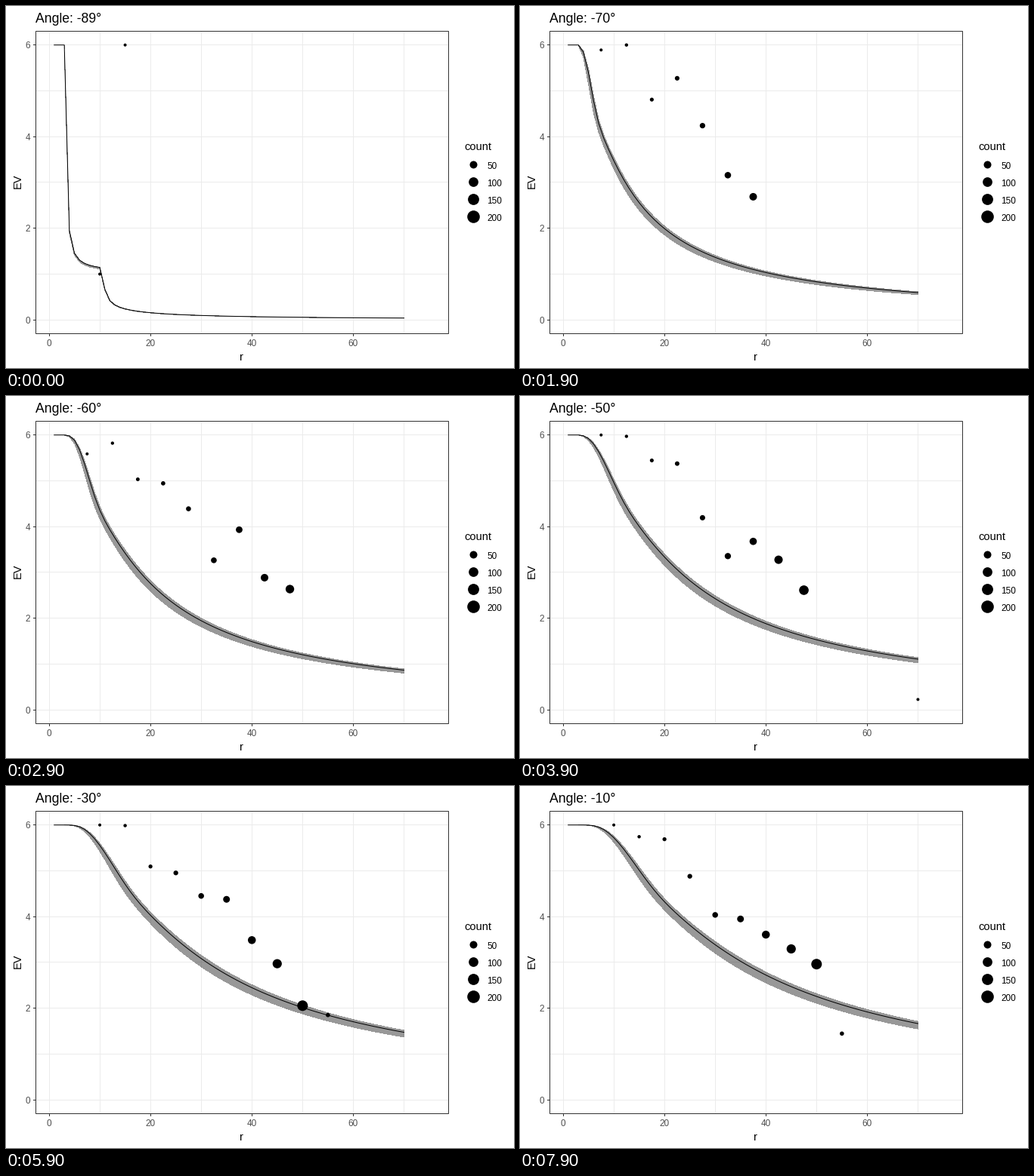
A matplotlib script that plays this animation: 672 px wide and 480 px high, repeating every 8 s.

```python
import numpy as np
import matplotlib.pyplot as plt
from matplotlib.animation import FuncAnimation
from matplotlib.patches import Polygon, Rectangle

W, H, DPI = 672, 480, 96
FRAMES, INTERVAL = 80, 100
PX = 72 / DPI
GREY = "#333333"
R = np.arange(1, 71)

plt.rcParams["font.family"] = "Liberation Sans"


def to_px(r, ev):
    return 57 + 6.706 * np.asarray(r), 416.2 - 60.75 * np.asarray(ev)


def steep_curve(r):
    """Curve at the steepest angle: a shelf up to r = 10, then a long tail."""
    shelf = 1.05 + 0.9 / np.maximum(r - 3, 0.1) ** 1.15
    tail = 2.2 / r + 0.47 / np.maximum(r - 10, 0.1)
    return np.where(r <= 10, shelf, tail)


def curve(angle, r, spread=1.0):
    """EV over r; spread above 1 lowers the curve, below 1 raises it."""
    c = np.cos(np.radians(angle))
    r = np.asarray(r, float)
    u = r * spread / c
    p = 1.29 + 0.8 * max(0, (0.643 - c) / 0.3)
    near = 6 * (1 - np.exp(-1.303 * (20 / u) ** p))
    far = 6 / (1 + (u / 20.4) ** 2.1) ** (1 / 2.1)
    mix = 1 / (1 + np.exp(np.minimum((u - 18) / 2.5, 50)))
    ev = mix * near + (1 - mix) * far
    w = np.clip((0.15 - c) / 0.1325, 0, 1)
    ev = (1 - w) * ev + w * steep_curve(r) / min(max(spread, 1), 1.03)
    return np.where(r <= 3, 6, ev)


def dots(angle):
    """r, EV and radius: EV falls and radius grows with r, plus some noise."""
    rng = np.random.default_rng(100 - angle)
    steep = np.clip((-84 - angle) / 5, 0, 1)
    start = 7.5 if -85 < angle < -35 else 10
    last = 15 + 44.5 * (1 - np.exp(-(angle + 89) / 22))
    r = np.arange(start, last + 0.01, 5)
    peak = min(r[-1], 50)
    t = (r - start) / (peak - start)

    first_ev, last_ev = 6 - 5 * steep, 2.4 + 3.6 * steep
    ev = first_ev + (last_ev - first_ev) * t ** 1.2
    ev += (1 - steep) * rng.normal(0, 0.3, len(r))
    grow = (1 - steep) * np.clip(3 + (angle + 70) / 15, 1.5, 5)
    radius = np.where(r > peak, 2.8, 2 + grow * t ** 1.5)

    # now and then a lone weak hit far out
    if angle > -70 and rng.random() < 0.4:
        r = np.append(r, 60 + 5 * rng.integers(4))
        ev = np.append(ev, rng.random() ** 3)
        radius = np.append(radius, 2)
    return r, np.clip(ev, 0, 6), radius


def shown_angle(i):
    """The picture steps twice in every five ticks and holds in between."""
    if i < 3:
        k = 0
    elif i == 3 or i % 5 == 4:
        k = i
    else:
        k = i - i % 5
    return k - 89


def area(radius):
    return (2 * np.asarray(radius) * PX) ** 2


fig = plt.figure(figsize=(W / DPI, H / DPI), dpi=DPI, facecolor="white")
ax = fig.add_axes([0, 0, 1, 1])
ax.set_xlim(0, W)
ax.set_ylim(H, 0)
ax.axis("off")


def rule(x, y, color):
    ax.plot(x, y, color=color, lw=PX, snap=False,
            solid_capstyle="butt", zorder=1)


def label(x, y, s, size, color="black", **kw):
    return ax.text(x, y, s, fontsize=size, color=color, va="baseline", **kw)


for r in range(0, 80, 10):
    x = np.floor(to_px(r, 0)[0]) + 0.5
    rule([x, x], [34, 434], "#ebebeb")
    if r % 20 == 0 and r < 70:
        rule([x, x], [435, 438], GREY)
        label(x - 0.5, 451, str(r), 8.8, "#4d4d4d", ha="center")
for ev in range(7):
    y = np.floor(to_px(0, ev)[1]) + 0.5
    rule([40, 585], [y, y], "#ebebeb")
    if ev % 2 == 0:
        rule([36, 39], [y, y], GREY)
        label(32, y + 4.5, str(ev), 8.8, "#4d4d4d", ha="right")

ax.add_patch(Rectangle((39.5, 33.5), 546, 401, fill=False, ec=GREY, lw=PX,
                       snap=False, zorder=6))

label(311.5, 470, "r", 11, ha="center")
label(19.5, 232.5, "EV", 11, ha="center", rotation=90, rotation_mode="anchor")
label(606, 191, "count", 11)
for k in range(4):
    n, y = 50 * (k + 1), 210 + 23.1 * k
    ax.scatter(618.2, y, s=area(1.7 + 0.466 * n ** 0.5), c="black", lw=0)
    label(636, y + 5.5, str(n), 8.8)

title = label(39, 22, "", 13.2)
band = ax.add_patch(Polygon(np.zeros((3, 2)), fc=GREY, alpha=0.5, lw=0,
                            antialiased=False, zorder=2))
line, = ax.plot([], [], color="black", lw=PX, zorder=3)
cloud = ax.scatter([], [], c="black", lw=0, zorder=4)


def draw(i):
    angle = shown_angle(i)
    title.set_text(f"Angle: {angle}°")
    line.set_data(*to_px(R, curve(angle, R)))
    top = np.column_stack(to_px(R, curve(angle, R, 1 / 1.03)))
    bottom = np.column_stack(to_px(R, curve(angle, R, 1.08)))
    band.set_xy(np.vstack([top, bottom[::-1]]))
    r, ev, radius = dots(angle)
    cloud.set_offsets(np.column_stack(to_px(r, ev)))
    cloud.set_sizes(area(radius))
    return title, line, band, cloud


anim = FuncAnimation(fig, draw, frames=FRAMES, interval=INTERVAL,
                     repeat=True, repeat_delay=0, blit=False)
plt.show()
```
